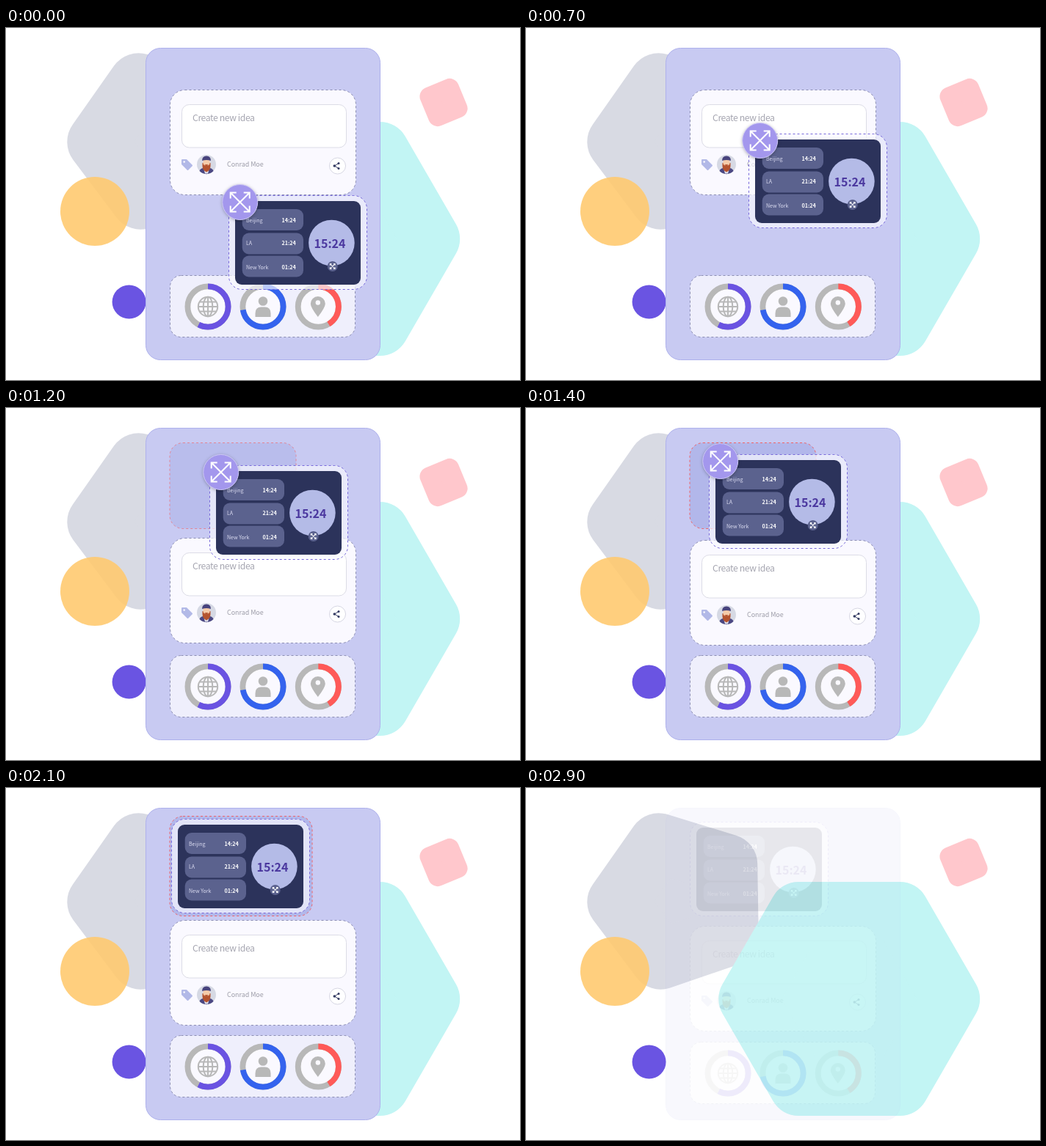
Recreate the animation shown at these times as an HTML page. Size 700 by 480 pixels, loop 3200 ms.

```html
<!DOCTYPE html>
<html lang="en">
<head>
<meta charset="utf-8">
<title>Widget board</title>
<style>
  html, body { margin: 0; width: 100%; height: 100%; overflow: hidden; background: #fff; }
  svg { display: block; width: 700px; height: 480px; }
  text { font-family: "Noto Sans CJK SC", "Noto Sans CJK JP", "Open Sans", sans-serif; }
  .dashed { stroke: #8b8db2; stroke-dasharray: 3 3; }
  .icon { fill: #b8b8b8; }
  .expand { fill: none; stroke: #fff; }
  .city { font-size: 7px; font-weight: 500; fill: #dcddf2; }
  .time { font-size: 7.2px; font-weight: 700; fill: #fff; }
</style>
</head>
<body>
<svg viewBox="0 0 700 480">
  <defs>
    <path id="expand" d="M-13-5v-8h8M5-13h8v8M13 5v8h-8M-5 13h-8v-8M-13-13 13 13M13-13-13 13"/>
  </defs>

  <g id="shapes" stroke-linejoin="round"></g>
  <circle cx="121" cy="250" r="47" fill="#ffca70" opacity=".9"/>
  <circle cx="167.6" cy="373.5" r="23" fill="#6a54e2"/>

  <g id="panel">
    <rect x="190.5" y="27.5" width="319" height="425" rx="20" fill="#c8caf2" stroke="#aeb1ec"/>
    <rect id="slot" x="223" rx="18" fill="#b2b7ea" stroke="#f06468" stroke-dasharray="3 3"/>

    <g id="rings">
      <rect class="dashed" x="223.5" y="337.5" width="252" height="84" rx="15" fill="#efeffc"/>
    </g>

    <g id="card">
      <rect class="dashed" x="223.5" y="84.5" width="253" height="143" rx="20" fill="#faf9ff"/>
      <rect x="239.5" y="104.5" width="224" height="58.5" rx="10" fill="#fff" stroke="#dcdce6"/>
      <text x="254" y="127" font-size="12.2" letter-spacing="-.4" fill="#a5a5b0">Create new idea</text>
      <path d="M240 180v5.5l7.5 7.5 5.5-5.5-7.5-7.5z" fill="#b2b9e7" stroke="#b2b9e7" stroke-width="2" stroke-linejoin="round"/>
      <circle cx="242.7" cy="182.5" r="1.3" fill="#faf9ff"/>

      <circle cx="273" cy="186" r="13" fill="#d6d9e4"/>
      <path d="M263.5 195q1.500-4 5.500-4h8q4 0 5.500 4a13 13 0 0 1-19 0z" fill="#4b4883"/>
      <path d="M269 191h8l-2 7.500h-4z" fill="#dfe1ec"/>
      <path d="M267.500 184h11v4q0 6-5.500 8.500-5.500-2.500-5.500-8.500z" fill="#b4532f"/>
      <path d="M268.500 180h9v5q-1 3-4.500 3t-4.500-3z" fill="#f5cba9"/>
      <path d="M267 181q0-6.500 6-6.500t6 6.500q-6-2-12 0z" fill="#48437d"/>
      <path d="M270 187q3-2 6 0-3 2-6 0z" fill="#b4532f"/>

      <text x="301" y="189" font-size="8.9" font-weight="500" fill="#9b9ba6">Conrad Moe</text>
      <circle cx="451.500" cy="188" r="11" fill="#fff" stroke="#d6d6e3"/>
      <path d="M453 184.500 447.500 188 453 191.500" fill="none" stroke="#333a62"/>
      <g fill="#333a62">
        <circle cx="453" cy="184.500" r="1.500"/>
        <circle cx="447.300" cy="188" r="1.800"/>
        <circle cx="453" cy="191.500" r="1.500"/>
      </g>
    </g>

    <g id="widget">
      <rect x="303.5" y="228.5" width="188" height="128" rx="18" fill="#faf9ff" fill-opacity=".68" stroke="#7768da" stroke-dasharray="3 3"/>
      <rect x="312" y="236" width="171" height="114" rx="9" fill="#2c335b"/>
      <g id="rows"></g>
      <circle cx="443.400" cy="293" r="31.300" fill="#b4bbe7"/>
      <text x="441" y="300" font-size="16" font-weight="700" text-anchor="middle" fill="#4b389f">15:24</text>
      <circle cx="444.700" cy="325" r="7" fill="#5b628e"/>
      <use href="#expand" class="expand" transform="translate(444.700 325) scale(.26)" stroke-width="4"/>
    </g>

    <g id="knob">
      <circle r="24" fill="#a397ed" stroke="#cdc8f6" style="filter:drop-shadow(0 1px 2px #0004)"/>
      <use href="#expand" class="expand" stroke-width="2"/>
    </g>
  </g>
</svg>

<script>
const LOOP = 3200, STEP = 100;
const el = id => document.getElementById(id);
const add = (id, markup) => el(id).insertAdjacentHTML('beforeend', markup);

// Regular polygon whose thick round stroke forms the rounded corners.
function roundedPolygon(cx, cy, radius, sides, startDeg, corner, color) {
  const points = Array.from({ length: sides }, (_, i) => {
    const a = (startDeg + i * 360 / sides) * Math.PI / 180;
    return `${cx + radius * Math.cos(a)},${cy + radius * Math.sin(a)}`;
  });
  add('shapes', `<polygon points="${points.join(' ')}" fill="${color}" stroke="${color}" stroke-width="${corner * 2}"/>`);
}
roundedPolygon(207.6, 154, 83.3, 5, -108.9, 41, '#d8dae3');
roundedPolygon(440.2, 287.5, 138, 6, 0, 40, '#c2f5f4');
roundedPolygon(596, 101.5, 21.2, 4, 22.5, 13, '#ffc7cc');

const globe = `<g fill="none" stroke="#b8b8b8" stroke-width="2">
  <circle r="13.2"/><ellipse rx="6.3" ry="13.2"/>
  <path d="M0-13V13M-13 0H13M-11.500-6.500H11.500M-11.500 6.500H11.500"/></g>`;
const person = `<g class="icon"><circle cy="-7.500" r="6.300"/>
  <path d="M-10.500 14V9q0-8.500 8-8.500h5q8 0 8 8.500v5z"/></g>`;
const pin = `<path class="icon" d="M-.5 14Q-10.500 1-10.500-4a10 10 0 0 1 20 0q0 5-10 18z"/>
  <circle cx="-.5" cy="-5.500" r="3.200" fill="#faf9ff"/>`;

[[275, 57.6, '#6a53e2', globe], [350, 72.5, '#3463ee', person], [425.3, 41.5, '#ff5a58', pin]]
  .forEach(([x, percent, color, icon]) => add('rings', `<g transform="translate(${x} 380)">
    <circle r="27.600" fill="#faf9ff" stroke="#b8b8b8" stroke-width="7.800"/>
    <circle r="27.600" fill="none" stroke="${color}" stroke-width="7.800" pathLength="100"
      stroke-dasharray="${percent} 100" transform="rotate(-90)"/>${icon}</g>`));

[['Beijing', '14:24', 247, 265], ['LA', '21:24', 279.5, 295.5], ['New York', '01:24', 310.5, 329]]
  .forEach(([city, time, top, base]) => add('rows', `
    <rect x="321.700" y="${top}" width="83.300" height="29" rx="9" fill="#5b628e"/>
    <text class="city" x="327" y="${base}">${city}</text>
    <text class="time" x="375.500" y="${base}">${time}</text>`));

// Keys are [time, ...values]; values run linearly between keys.
function track(keys, t) {
  const next = keys.findIndex(k => k[0] > t);
  if (next === 0) return keys[0].slice(1);
  if (next < 0) return keys[keys.length - 1].slice(1);
  const a = keys[next - 1], b = keys[next];
  const u = (t - a[0]) / (b[0] - a[0]);
  return a.slice(1).map((v, i) => v + (b[i + 1] - v) * u);
}

const widgetPath = [
  [400, 0, 0], [500, 0, -21], [700, 0, -84], [800, 0, -111], [900, 0, -129], [1000, 0, -134],
  [1200, -26, -150], [1400, -54, -165], [1600, -70, -177], [1700, -78, -186],
  [2300, -78, -186], [2400, -80, -182]];
const cardDrop = [
  [800, 0], [900, 15], [1000, 48], [1100, 79], [1200, 93], [1300, 96], [2300, 96], [2400, 104]];
const slotBox = [[1400, 172, 47.5, 117], [1600, 194, 38.5, 136]];
const slotFade = [[1000, 0], [1300, 1], [2300, 1], [2400, 0]];
const knobExit = [[1900, 1, 1], [2000, 1.1, .5], [2100, 1.1, 0]];

const move = (id, x, y, scale = 1) =>
  el(id).setAttribute('transform', `translate(${x} ${y}) scale(${scale})`);

function draw() {
  const t = Math.floor(performance.now() % LOOP / STEP) * STEP;
  const [x, y] = track(widgetPath, t);
  const [knobScale, knobOpacity] = track(knobExit, t);
  const [width, top, height] = track(slotBox, t);

  move('widget', x, y);
  move('knob', 318.7 + x, 237.5 + y, knobScale);
  el('knob').setAttribute('opacity', knobOpacity);
  move('card', 0, track(cardDrop, t)[0]);
  move('rings', 0, t >= 2400 ? 9 : 0);

  const slot = el('slot');
  slot.setAttribute('width', width);
  slot.setAttribute('y', top);
  slot.setAttribute('height', height);
  slot.setAttribute('opacity', track(slotFade, t)[0]);

  el('panel').setAttribute('opacity', t >= 2900 ? .11 : 1);
  requestAnimationFrame(draw);
}
draw();
</script>
</body>
</html>
```
